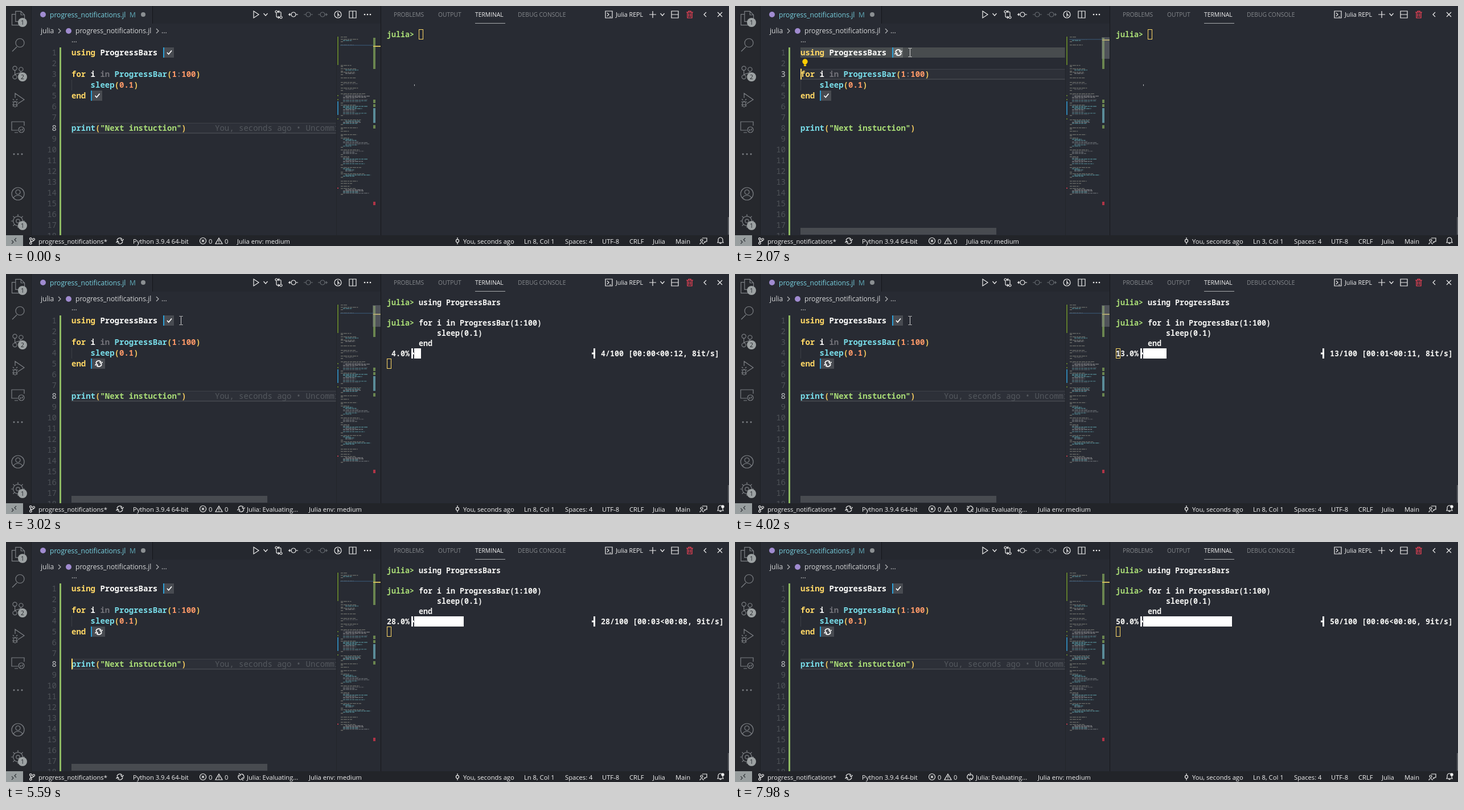
Animation, 1270 px wide and 423 px high, one loop 8000 ms. Source, as an HTML page:

```html
<!DOCTYPE html>
<html lang="en">
<head>
<meta charset="utf-8">
<title>Editor and REPL</title>
<style>
  html, body { margin: 0; width: 100%; height: 100%; overflow: hidden; background: #282b33; }
  svg { display: block; width: 1270px; height: 423px; }
  text { white-space: pre; font-family: "Open Sans", "Noto Sans", sans-serif; }
  .mono { font-family: "Noto Sans Mono", "DejaVu Sans Mono", monospace; font-size: 14px; font-weight: 500; }
  .code { font-weight: 600; }
  .term { font-size: 13.333px; font-weight: 600; fill: #f4f4f2; }
  .ui { font-size: 12.1px; }
  .bar { font-size: 11.2px; fill: #f2f2f2; }
  .cap { font-size: 10.3px; }
  .ico { fill: none; stroke-width: 1.2; vector-effect: non-scaling-stroke; }
  .k { fill: #ffd866; } .f { fill: #78dce8; } .n { fill: #fc9867; }
  .s { fill: #a9dc76; } .g { fill: #727279; } .w { fill: #fcfcfa; } .p { fill: #f0c75e; }
</style>
</head>
<body>
<svg id="stage" viewBox="0 0 1270 423" xmlns="http://www.w3.org/2000/svg"></svg>
<script>
const LOOP = 8000, CLICK = 945, RUN1 = 1920, STEP = 1990, RUN2 = 2475, LOOP_START = 2545;
const BG = '#282b33', GREY = '#7d8085', WHITE = '#eeeeee';

const text = (x, y, s, cls = 'ui', fill = '', extra = '') =>
  `<text x="${x}" y="${y}" class="${cls}" ${fill && `fill="${fill}"`} ${extra}>${s}</text>`;
const rect = (x, y, w, h, fill, extra = '') =>
  `<rect x="${x}" y="${y}" width="${w}" height="${h}" fill="${fill}" ${extra}/>`;
const dot = (x, y, r, fill) => `<circle cx="${x}" cy="${y}" r="${r}" fill="${fill}"/>`;
const ico = (x, y, d, c = GREY, k = 1, extra = '') =>
  `<path class="ico" transform="translate(${x} ${y}) scale(${k})" d="${d}" stroke="${c}" ${extra}/>`;
const ring = r => `M${-r} 0a${r} ${r} 0 1 0 ${2 * r} 0a${r} ${r} 0 1 0 ${-2 * r} 0`;
const group = (id, body, extra = '') => `<g id="${id}" ${extra}>${body}</g>`;
const span = (cls, s) => `<tspan class="${cls}">${s}</tspan>`;
const lineY = n => 82 + 19 * (n - 1);
const code = (n, body) => text(115, lineY(n) + 5, body, 'mono code');
const badge = (y, s) => dot(29, y, 8, '#9da2a3') + text(29, y + 3.5, s, 'cap', '#22252a', 'text-anchor="middle"');

const SYNC = 'M-5-1A5 5 0 0 1 4-3M5 1A5 5 0 0 1-4 3M6.5-3L4 0 1.5-3M-6.5 3L-4 0-1.5 3';
const BRANCH = 'M-3-2.5V2.5M3-1C3 2-3 0-3 3' + 'M-5-4a2 2 0 1 0 4 0a2 2 0 1 0-4 0M-5 4.5a2 2 0 1 0 4 0a2 2 0 1 0-4 0M1-3a2 2 0 1 0 4 0a2 2 0 1 0-4 0';
const CHECK = 'M-4 0L-1.3 3 4-3.5';
const COMMIT = ring(3) + 'M0-7V-3M0 3V7';
const DOWN = 'M-3.5-2L0 2 3.5-2', RIGHT = 'M-2-4L2 0-2 4';
const SPLIT = 'M-6-6H6V6H-6ZM0-6V6';

function sidebar() {
  const dots = [-7, 0, 7].map(d => dot(21 + d, 261, 1.5, GREY)).join('');
  const spokes = Array.from({ length: 8 }, (_, i) => {
    const c = Math.cos(i * Math.PI / 4), s = Math.sin(i * Math.PI / 4);
    return `M${c * 8} ${s * 8}L${c * 11.5} ${s * 11.5}`;
  }).join('');
  return rect(0, 0, 44, 404, '#26282d') + rect(44, 0, 1, 404, '#1d2025') +
    ico(21, 21, 'M-4-11H5L11-5V6H-4ZM5-11V-5H11M-4-6H-10V12H4V6', GREY, 1.05) + badge(29, 1) +
    ico(22, 68, 'M-3 4L-11 12M-5-3a7.5 7.5 0 1 0 15 0a7.5 7.5 0 1 0-15 0') +
    ico(21, 117, BRANCH, GREY, 1.8) + badge(125, 2) +
    ico(21, 165, 'M-5-3V-11L11 0 0 7M-10 4H0M-10 9H0M-9-1L-7 1M-1-1L-3 1M-9 12L-8 11M-1 12L-2 11M-8 8a3 5 0 1 0 6 0a3 5 0 1 0-6 0') +
    ico(21, 213, 'M0 6H-11V-9H11V-2M-6 10H0M1 5a5 5 0 1 0 10 0a5 5 0 1 0-10 0M3.5 4L5 6 3.5 7M8.5 3L7 5 8.5 6') + dots +
    ico(21, 331, ring(11) + 'M-4-3a4 4 0 1 0 8 0a4 4 0 1 0-8 0M-8 8C-6 1 6 1 8 8') +
    ico(21, 379, ring(8) + ring(3) + spokes, GREY, 1.05) + badge(387, 1);
}

function tabs() {
  let s = rect(45, 0, 613, 31, '#25282f') + rect(45, 0, 212, 31, BG) + rect(257, 0, 1, 31, '#15171b');
  s += dot(65, 15, 5, '#a08bd0') + text(77, 19.5, 'progress_notifications.jl', 'ui', '#78d0df') +
    text(217, 19.5, 'M', 'ui', '#5fa9b8') + dot(241, 15, 4, '#8b8f92');
  s += text(61, 48, 'julia', 'ui', '#d6d7d8') + ico(94, 44, RIGHT, '#b5b7ba') + dot(110, 44, 5, '#a08bd0') +
    text(122, 48, 'progress_notifications.jl', 'ui', '#d6d7d8') + ico(266, 44, RIGHT, '#b5b7ba') + text(273, 48, '...', 'ui', '#d6d7d8');
  s += ico(439, 15, 'M-4-6L5 0-4 6Z', WHITE) + ico(456, 15, DOWN, WHITE) +
    ico(479, 15, 'M-4-3V3Q-4 5-1 5H1M4 3V-3Q4-5 1-5H-1M1-7L-1-5 1-3M-1 7L1 5-1 3M-6-5a2 2 0 1 0 4 0a2 2 0 1 0-4 0M2 5a2 2 0 1 0 4 0a2 2 0 1 0-4 0', WHITE) +
    ico(505, 15, ring(4) + 'M4 0H8M-4 0H-8L-6-2M-8 0L-6 2', WHITE) +
    ico(531, 15, ring(4) + 'M4 0H8M-4 0H-8', '#666a70') +
    ico(556, 15, ring(4) + 'M-4 0H-8M4 0H8L6-2M8 0L6 2', '#666a70') +
    ico(583, 15, ring(6) + 'M0-4V4M0-1L3 2', WHITE) + ico(609, 15, SPLIT, WHITE);
  return s + [630, 635, 640].map(x => dot(x, 15, 1.3, WHITE)).join('');
}

function minimap() {
  let seed = 7;
  const rnd = () => (seed = seed * 16807 % 2147483647) / 2147483647;
  const inks = ['#78dce8', '#c8c8c8', '#74777d', '#78dce8', '#9aa0a4'];
  const blocks = [[54, 1], [58, 3], [68, 1], [104, 2], [110, 3], [116, 3], [126, 1], [134, 3], [144, 3], [154, 9],
    [174, 10], [200, 5], [214, 2], [220, 1], [226, 2], [232, 9], [253, 5], [265, 8], [284, 5], [295, 4], [308, 1], [312, 1], [317, 1], [321, 6]];
  let s = '';
  for (const [y, rows] of blocks) for (let i = 0; i < rows; i++) {
    const edge = i === 0 || i === rows - 1;
    const x = 588 + (edge ? 0 : 4 + 4 * (rnd() > .75));
    const w = i && i === rows - 1 ? 4 : Math.min(12 + rnd() * (rows > 3 ? 34 : 20), 645 - x);
    s += `<path d="M${x} ${y + i * 2.03 + .8}h${w.toFixed(1)}" stroke="${edge ? '#c4c3ae' : inks[rnd() * 5 | 0]}" stroke-width="1.1" stroke-dasharray="4 1 6 1 3 1" opacity=".55"/>`;
  }
  return rect(580, 53, 78, 351, BG) + rect(580, 53, 1, 351, '#22252b') + s +
    rect(582, 54, 2, 50, '#5d7a2c') + rect(582, 157, 2, 2, '#5d7a2c') + rect(582, 164, 2, 2, '#5d7a2c') +
    rect(582, 168, 2, 24, '#2f80ad') + rect(582, 198, 2, 2, '#5d7a2c') + rect(582, 320, 2, 2, '#b5384a') +
    rect(645, 56, 4, 55, '#6a854f') + rect(645, 165, 4, 6, '#6a854f') + rect(645, 173, 4, 5, '#6a854f') +
    rect(645, 180, 4, 26, '#5a8c99') + rect(645, 210, 4, 6, '#6a854f') + rect(645, 345, 4, 6, '#b03446');
}

function editor() {
  const nums = Array.from({ length: 18 }, (_, i) =>
    text(89, lineY(i + 1) + 5, i + 1, 'mono num', '#4f5359', 'text-anchor="end"')).join('');
  const chip = (x, y, w, mark) => rect(x, y - 9, w, 18, '#fff', 'fill-opacity=".15"') + rect(x, y - 9, 2, 18, '#2b9fd6') + mark;
  const mark = (x, y, d) => ico(x, y, d, '#fff', 1, 'style="stroke-width:1.7px"');
  return `<clipPath id="pane"><rect x="45" y="53" width="534.5" height="351"/></clipPath><g clip-path="url(#pane)">` +
    group('row', rect(115, -9, 465, 18, '#2d3038') + rect(115, -9, 465, 1, '#3f4249') + rect(115, 8, 465, 2, '#3f4249')) +
    rect(165, 73, 129, 18, '#45484c', 'id="word"') + rect(115, 73, 465, 18, '#484c4e', 'id="flash1"') +
    rect(115, 111, 465, 57, '#484c4e', 'id="flash2"') +
    text(115, 64, '...', 'ui', '#d8d8d8') + nums + rect(94, 73, 3, 331, '#8fba63') + rect(115, 130, 1, 19, '#3b3e45') +
    code(1, span('k', 'using') + span('w', ' ProgressBars')) +
    code(3, span('k', 'for') + span('w', ' i ') + span('g', 'in') + span('f', ' ProgressBar') + span('p', '(') +
      span('n', '1') + span('g', ':') + span('n', '100') + span('p', ')')) +
    code(4, span('f', '    sleep') + span('p', '(') + span('n', '0.1') + span('p', ')')) + code(5, span('k', 'end')) +
    code(8, span('f', 'print') + span('p', '(') + span('s', '"Next instuction"') + span('p', ')')) +
    chip(276, 82, 19, '') + group('done1', mark(287, 82, CHECK)) + group('busy1', mark(287, 82, SYNC)) +
    group('done2', chip(149, 158, 20, mark(160.5, 158, CHECK))) + group('busy2', chip(149, 158, 25, mark(163, 158, SYNC))) +
    text(0, 5, 'You, seconds ago • Uncommitted changes', 'mono', '#54585e', 'id="ghost"') +
    group('bulb', dot(123, 98, 4.7, '#ffcc00') + rect(121, 101, 4, 5, '#ffcc00') + rect(121.5, 103, 3, .8, '#6b5a10')) +
    rect(0, -9.5, 2, 19, '#ffd866', 'id="caret"') + rect(115, 391, 344, 12, '#484b50', 'id="hbar"') + '</g>' +
    minimap() + rect(587, 0, 58, 1.5, '#344b63', 'id="mapRow"') + rect(645, 0, 13, 2, '#cdbb5c', 'id="mapCaret"') +
    rect(644, 55, 14, 38, '#85888c', 'id="vbar" fill-opacity=".42"');
}

function terminal() {
  const row = (y, s, extra = '') => text(669, y + 5, s, 'mono term', '', extra);
  const prompt = '<tspan class="s">julia&gt; </tspan>';
  let s = rect(658, 0, 612, 404, BG) + rect(658, 0, 1, 404, '#17191d');
  for (const [x, name] of [[681, 'PROBLEMS'], [759, 'OUTPUT'], [824, 'TERMINAL'], [899, 'DEBUG CONSOLE']])
    s += text(x, 19, name, 'cap', x === 824 ? '#f0f0f0' : '#85888c');
  s += rect(824, 30, 53, 1, '#a8abad') + ico(1059, 15, 'M-6-6H6V6H-6ZM-3-3L0 0-3 3M1 4H4', WHITE) +
    text(1071, 19, 'Julia REPL', 'bar', WHITE, 'style="font-size:10.7px"') +
    ico(1136, 15, 'M-6 0H6M0-6V6', WHITE) + ico(1153, 15, DOWN, WHITE) + ico(1175, 15, 'M-6-6H6V6H-6ZM-6 0H6', WHITE) +
    ico(1201, 15, 'M-6-4H6M-2-4V-6H2V-4M-4-4V6H4V-4M-1.5-2V4M1.5-2V4', '#ff4358') +
    ico(1228, 15, 'M2-4L-2 0 2 4', WHITE) + ico(1254, 15, 'M-4-4L4 4M4-4L-4 4', WHITE);
  s += row(50, prompt) + row(50, '       using ProgressBars', 'id="ran1"') + group('next', row(86, prompt)) +
    group('ran2', row(86, '       for i in ProgressBar(1:100)') + row(104, '           sleep(0.1)') + row(122, '       end'));
  s += group('progress', row(140, '', 'id="pct"') + rect(712, 131, 3, 18, '#fff') + rect(715, 138.5, 2, 3, '#fff') +
    rect(717, 131, 0, 18, '#fff', 'id="fill"') + rect(1032, 131, 3, 18, '#fff') + rect(1029, 138.5, 3, 3, '#fff') +
    text(1045, 145, '', 'mono term', '', 'id="stat"'));
  return s + '<rect id="block" width="7" height="17" fill="none" stroke="#ffd866"/>' +
    rect(717, 138, 1, 3, '#b5b7ba') + rect(1268, 372, 2, 31, '#575a60');
}

function statusbar() {
  const y = 418.5;
  let s = rect(0, 404, 1270, 19, '#222429') + rect(0, 404, 30, 19, '#989e9f') +
    ico(14, 414, 'M-4-1L-1 2-4 5M4-5L1-2 4 1', '#33373b') + ico(46, 414, BRANCH, WHITE, .9) +
    text(57, y, 'progress_notifications*', 'bar') + ico(200, 414, SYNC, WHITE) + text(223, y, 'Python 3.9.4 64-bit', 'bar') +
    ico(346, 414, ring(5.5) + 'M-2-2L2 2M2-2L-2 2', WHITE) + text(356, y, '0', 'bar') +
    ico(374, 414, 'M0-5L6 5H-6ZM0-2V2M0 3V4', WHITE) + text(384, y, '0', 'bar');
  s += group('eval', `<g id="spin">${ico(0, 0, SYNC, WHITE)}</g>` + text(423, y, 'Julia: Evaluating...', 'bar')) +
    group('env', text(406, y, 'Julia env: medium', 'bar')) +
    group('blame', ico(793, 414, COMMIT, WHITE, .85) + text(803, y, 'You, seconds ago', 'bar')) + text(910, y, '', 'bar', '', 'id="pos"');
  for (const [x, name] of [[982, 'Spaces: 4'], [1047, 'UTF-8'], [1095, 'CRLF'], [1136, 'Julia'], [1176, 'Main']]) s += text(x, y, name, 'bar');
  return s + ico(1225, 414, 'M-2-5H6V1H4L2 3V1M-5-1a2 2 0 1 0 4 0a2 2 0 1 0-4 0M-6 6C-6 2 0 2 0 6', WHITE) +
    ico(1255, 414, 'M-5 3H5L4 1V-2A4 4 0 0 0-4-2V1ZM-1.5 3.5Q0 6 1.5 3.5', WHITE) + group('news', dot(1259, 410, 2.7, WHITE));
}

document.getElementById('stage').innerHTML = rect(0, 0, 1270, 423, BG) + sidebar() + tabs() + editor() + terminal() + statusbar() +
  group('mouse', ico(0, 0, 'M-3-7.5H-1Q0-7.5 0-6.5V6.5Q0 7.5-1 7.5H-3M3-7.5H1Q0-7.5 0-6.5M0 6.5Q0 7.5 1 7.5H3', '#d4d4d4', 1, 'style="stroke-width:1px"'));

const $ = id => document.getElementById(id);
const nums = document.querySelectorAll('.num');
const show = (id, on) => { $(id).style.display = on ? '' : 'none'; };
const fade = (id, v) => $(id).setAttribute('opacity', v);
const move = (id, x, y) => $(id).setAttribute('transform', `translate(${x} ${y})`);
const clamp = v => Math.max(0, Math.min(1, v));
const ramp = (t, a, b) => clamp((t - a) / (b - a));
const ease = p => p * p * (3 - 2 * p);
const clock = s => '00:' + String(Math.round(s)).padStart(2, '0');

function drawMouse(t) {
  const come = ease(ramp(t, 70, 830)), go = ease(ramp(t, 5030, 5520));
  const x = 1120.5 - 813 * come + 250 * go, y = 432 - 350 * come + 355 * go;
  move('mouse', x, y);
  show('mouse', y < 422);
  const enter = ramp(t, 430, 600);
  fade('vbar', enter * (1 - ramp(t, 5050, 5500)));
  fade('hbar', enter * (1 - ramp(t, 5900, 6600)));
}

function drawEditor(t) {
  const line = t < CLICK ? 8 : t < STEP ? 1 : t < RUN2 ? 3 : 8;
  const since = t < CLICK ? t + 670 : t - (line === 1 ? CLICK : line === 3 ? STEP : RUN2);
  const y = lineY(line);
  move('row', 0, y);
  move('caret', line === 1 ? 294 : 115, y);
  show('caret', Math.floor(since / 500) % 2 === 0);
  nums.forEach((el, i) => el.setAttribute('fill', i + 1 === line ? '#c4c6c8' : '#4f5359'));
  show('ghost', line === 8 ? t < CLICK || t > RUN2 && t < 2620 || t > 2750 : since > 230);
  if (t > RUN2 && t < 2620) move('ghost', 393, lineY(3));
  else move('ghost', line === 1 ? 345 : line === 3 ? 393 : 367, y);
  show('bulb', t > 1150 && t < 2640);
  show('word', t > 1150 && t < STEP);
  fade('flash1', t < RUN1 ? 0 : 1 - ramp(t, 2080, 2300));
  fade('flash2', t < RUN2 ? 0 : 1 - ramp(t, 2540, 2800));
  const busy1 = t >= RUN1 && t < 2200;
  show('busy1', busy1); show('done1', !busy1);
  show('busy2', t >= RUN2); show('done2', t < RUN2);
  move('mapRow', 0, line === 1 ? 54 : line === 3 ? 58 : 68.5);
  move('mapCaret', 0, line === 1 ? 55 : line === 3 ? 59 : 70);
  $('pos').textContent = line === 1 ? 'Ln 1, Col 19' : `Ln ${line}, Col 1`;
  $('pos').setAttribute('x', line === 1 ? 904 : 910);
  move('blame', line === 1 ? -7 : 0, 0);
}

function drawTerminal(t) {
  const n = Math.max(0, Math.floor((t - LOOP_START) / 107));
  const running = t >= 2560, printing = t >= 2652;
  show('ran1', t >= 2080); show('next', t >= 2160);
  show('ran2', running); show('progress', printing);
  if (printing) {
    const spent = .03 + n * .1095, rate = Math.max(1, Math.floor(n / spent));
    $('pct').textContent = (n.toFixed(1) + '%').padStart(5);
    $('fill').setAttribute('width', Math.round(312 * n / 100));
    $('stat').textContent = `${n}/100 [${clock(spent)}<${clock((100 - n) / rate)}, ${rate}it/s]`;
  }
  const top = n % 7 === 6;
  if (printing) move('block', 669.5, top ? 131.5 : 149.5);
  else if (running) move('block', 669.5, 131.5);
  else if (t >= 2080 && t < 2160) move('block', 669.5, 59.5);
  else move('block', 725.5, t < 2080 ? 41.5 : 77.5);
  const evaluating = t >= 2600;
  show('eval', evaluating); show('news', evaluating);
  move('env', evaluating ? 126 : 0, 0);
  $('spin').setAttribute('transform', `translate(413 414) rotate(${t * .24 % 360})`);
}

const start = performance.now();
function frame() {
  const t = (performance.now() - start) % LOOP;
  drawMouse(t);
  drawEditor(t);
  drawTerminal(t);
  requestAnimationFrame(frame);
}
frame();
</script>
</body>
</html>
```
